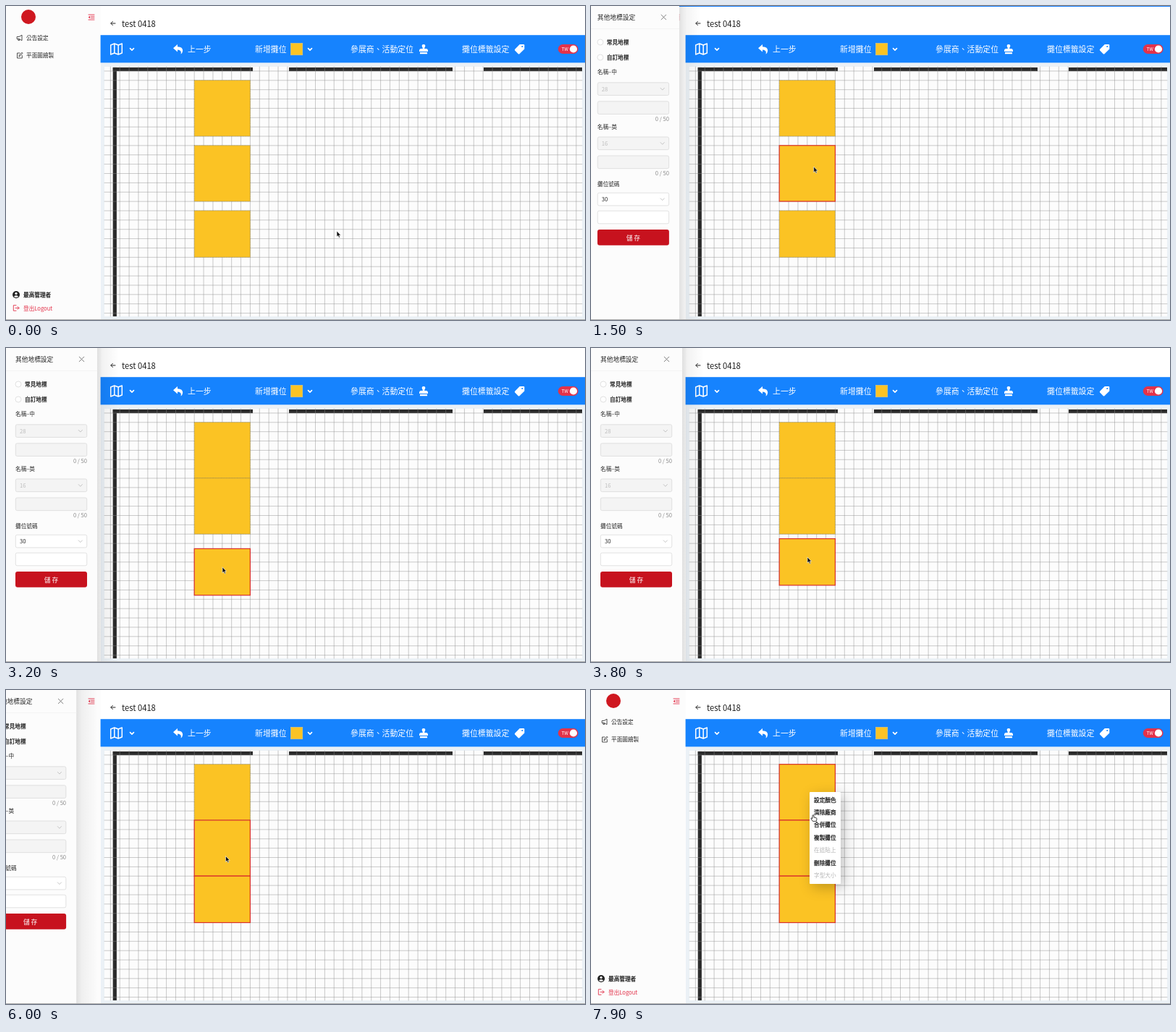
Recreate the animation shown at these times as an HTML page. Size 800x434 px, loop 8 s.

```html
<!DOCTYPE html>
<html lang="zh-Hant">
<head>
<meta charset="utf-8">
<title>Booth planner</title>
<style>
  html, body { margin: 0; width: 100%; height: 100%; overflow: hidden; background: #fff; }
  svg { display: block; width: 800px; height: 434px; }
  text { font-family: "Noto Sans CJK TC", "Noto Sans TC", "Noto Sans CJK JP", "Noto Sans CJK", sans-serif; white-space: pre; }
  .line { fill: none; stroke-linecap: round; stroke-linejoin: round; }
  .medium { stroke: #1c1c1c; stroke-width: .25; }
  #menu { filter: drop-shadow(4px 5px 9px rgba(0, 0, 0, .24)); }
</style>
</head>
<body>
<svg id="stage" viewBox="0 0 800 434">
  <defs>
    <linearGradient id="shade">
      <stop offset="0" stop-opacity=".11"/>
      <stop offset=".25" stop-opacity=".05"/>
      <stop offset="1" stop-opacity="0"/>
    </linearGradient>
  </defs>
  <g id="page"></g>
  <g id="booths"></g>
  <rect id="progress" y="0" height="1" fill="#1a82ff"/>
  <g id="drawer"></g>
  <g id="menu"></g>
  <rect y="433" width="800" height="1" fill="#a9a9a9"/>
  <path id="arrow" d="M0 0V8L1.8 6.4 3.1 9.2 4.5 8.6 3.3 5.9H5.7Z" fill="#111" stroke="#fff" stroke-width=".6"/>
  <path id="hand" d="M-1 .5Q0-.6 1 .5V3.2L4 3.9Q5.2 4.3 5 5.6L4.2 8.6H-.6L-3 5.1Q-3.2 4-2.1 4L-1 4.9Z" fill="#fff" stroke="#111" stroke-width=".8"/>
</svg>
<script>
const $ = id => document.getElementById(id);
const BLUE = '#1683fe', RED = '#e3324a', GOLD = '#fbc324', INK = '#262626';
const CELL = 12.87, LOOP = 8000, STEP = 100;

const rect = (x, y, w, h, fill, extra = '') =>
  `<rect x="${x}" y="${y}" width="${w}" height="${h}" fill="${fill}" ${extra}/>`;
const line = (d, color, width = 1, extra = '') =>
  `<path class="line" d="${d}" stroke="${color}" stroke-width="${width}" ${extra}/>`;
const shape = (d, fill) => `<path d="${d}" fill="${fill}"/>`;
const disc = (x, y, r, fill, extra = '') =>
  `<circle cx="${x}" cy="${y}" r="${r}" fill="${fill}" ${extra}/>`;
// Text is placed by its vertical centre.
const text = (x, cy, str, size = 7.64, fill = INK, extra = '') =>
  `<text x="${x}" y="${cy + size * .38}" font-size="${size}" fill="${fill}" ${extra}>${str}</text>`;
const MID = 'text-anchor="middle"', END = 'text-anchor="end"', MEDIUM = 'class="medium"';

function grid() {
  let d = '';
  for (let x = 260.2 - 9 * CELL; x < 796; x += CELL) d += `M${x} 84V429`;
  for (let y = 102.8 - CELL; y < 429; y += CELL) d += `M136 ${y}H796`;
  return line(d, '#8c8c8c', .65, 'opacity=".7"');
}

function sidebar() {
  return rect(0, 0, 131, 434, '#fcfcfc') +
    disc(31, 15, 10, '#cf1820') +
    line('M114 12H122M117.5 14.3H122M117.5 16.6H122M114 19H122', RED, .9) +
    shape('M113.7 15.5L116.2 13.6V17.4Z', RED) +
    line('M15.5 42.5H18L22 40.2V47.6L18 45.5H15.5ZM16.8 45.8V47.6H18.6V46', INK, .8) +
    text(28, 44, '公告設定') +
    line('M19 65H15.5V72H22.3V68.5M18 69.5L18.3 68 22 64.2 23 65.2 19.3 69.1Z', INK, .8) +
    text(28, 68, '平面圖繪製') +
    disc(14, 399, 5, '#222') + disc(14, 397.3, 1.6, '#fff') +
    shape('M10.8 401.5Q14 398.5 17.2 401.5 14 404.2 10.8 401.5Z', '#fff') +
    text(24, 399.5, '最高管理者', 7.64, '#111', MEDIUM) +
    line('M14 413.7H10.3V421.2H14M13 417.4H18M16 415.4L18 417.4 16 419.4', RED, .9) +
    text(24, 417.7, '登出Logout', 7.64, RED);
}

function toolbar() {
  const label = (x, str) => text(x, 60, str, 10.9, '#fff');
  const chevron = x => line(`M${x - 2.5} 58.6L${x} 61.1 ${x + 2.5} 58.6`, '#fff', 1.6);
  return rect(130.6, 40.2, 669.4, 38.2, BLUE) +
    line('M144.7 54L149.8 52 155.2 54 160.3 52V65L155.2 67 149.8 65 144.7 67ZM149.8 52V65M155.2 54V67', '#fff', 1.5) +
    chevron(174) +
    shape('M231 58.2L237 53V56.2Q244.5 56.5 244.2 62 243.8 65 241.6 66.5 243.2 61 237 60.6V63.6Z', '#fff') +
    label(251, '上一步') + label(344, '新增攤位') +
    rect(393.4, 51.4, 16.4, 16.4, GOLD, 'stroke="#d8c78a" stroke-width=".6"') +
    chevron(420) +
    label(476, '參展商、活動定位') +
    shape('M575.8 59Q576 57.8 575 56.5 573.8 53 577 53 580.2 53 579 56.5 578 57.8 578.2 59H580.5Q583 59.2 583 62V63H571V62Q571 59.2 573.5 59ZM572 64H582V66.2H572Z', '#fff') +
    label(630, '攤位標籤設定') +
    shape('M709.8 53H715.2Q716.3 53 716.3 54.2V59.5L709.4 66.2Q708.6 66.8 707.8 66.2L703.2 61.6Q702.4 60.6 703.2 59.7Z', '#fff') +
    disc(713.3, 56, 1.1, BLUE) +
    rect(762.8, 53, 27.8, 13, RED, 'rx="6.5"') +
    text(767.5, 59.6, 'TW', 6.4, '#fff') + disc(784, 59.5, 5.1, '#fff');
}

$('page').innerHTML =
  rect(131, 0, 669, 40.5, '#fff') + sidebar() +
  line('M151 24H145M147.4 21.4L144.8 24 147.4 26.6', INK, 1) +
  text(160, 24.5, 'test 0418', 11.2, '#1d1d1d') +
  rect(131, 78.4, 669, 355, '#ebf1f6') + rect(136, 84, 660, 345, '#fcfcfc') +
  rect(147.7, 84.9, 5.2, 344.1, '#2b2b2b') +
  [[147.7, 341], [391, 617], [660, 796]].map(([a, b]) => rect(a, 84.9, b - a, 5.2, '#2b2b2b')).join('') +
  grid() + toolbar();

$('booths').innerHTML = [6, 6, 5].map(n =>
  rect(260.2, 0, 6 * CELL, n * CELL, GOLD)).join('');
const booths = [...$('booths').children];

function drawer() {
  const field = (y, off) => rect(13.3, y, 98.4, 17.6, off ? '#f4f4f4' : '#fff', 'rx="2" stroke="#d6d6d6" stroke-width=".7"');
  const select = (y, value, off) => field(y, off) +
    text(19, y + 9, value, 7.64, off ? '#bdbdbd' : INK) +
    line(`M100.2 ${y + 7.6}L102.8 ${y + 10.3} 105.4 ${y + 7.6}`, '#b8b8b8', .8);
  const radio = (y, str) => disc(17, y, 4, '#fff', 'stroke="#d4d4d4" stroke-width=".7"') +
    text(26, y + .3, str, 7.64, INK, MEDIUM);
  const name = (y, str, size) => text(13, y, str) + select(y + 14.3, size, true) +
    field(y + 40.3, true) + text(112, y + 64.5, '0 / 50', 7.64, '#8c8c8c', END);
  return rect(126, 0, 30, 434, 'url(#shade)') + rect(-20, 0, 146, 434, '#fcfcfc') +
    text(13, 15.8, '其他地標設定', 8.72) +
    line('M101.2 12.2L107.8 18.8M107.8 12.2L101.2 18.8', '#777', .9) +
    line('M0 31.5H126', '#f0f0f0', .6) +
    radio(50, '常見地標') + radio(71, '自訂地標') +
    name(91.5, '名稱–中', '28') + name(166.7, '名稱–英', '16') +
    text(13, 246, '攤位號碼') + select(258.3, '30') + field(283.2) +
    rect(13, 309, 99, 21.8, '#c7121e', 'rx="3"') +
    text(62.5, 320.2, '儲 存', 8.72, '#fff', MID);
}
$('drawer').innerHTML = drawer();

$('menu').innerHTML = rect(302, 141, 43, 127, '#fff', 'rx="1"') +
  ['設定顏色', '清除廠商', '合併攤位', '複製攤位', '在這貼上', '刪除攤位', '字型大小'].map((str, i) => {
    const off = i == 4 || i == 6;
    return text(308, 151.6 + i * 17.4, str, 7.64, off ? '#b4b4b4' : '#1c1c1c', off ? '' : MEDIUM);
  }).join('');

// Cursor stops: time, x, y
const path = [
  [0, 457, 311], [500, 457, 311], [1150, 307.7, 222], [1600, 307.7, 222], [2100, 305, 211],
  [2300, 304, 225], [2500, 302.5, 255], [2800, 299, 308.3], [3000, 299, 308.3],
  [3700, 299, 289], [5300, 299, 289], [5700, 303.5, 229.5], [6200, 303.5, 229.5],
  [6600, 302, 141], [7300, 302, 141], [7900, 307, 172.8], [LOOP, 307, 172.8]
];

function cursorAt(t) {
  const i = path.findIndex(p => p[0] > t);
  const [t0, x0, y0] = path[i - 1], [t1, x1, y1] = path[i];
  const k = (t - t0) / (t1 - t0);
  return [x0 + (x1 - x0) * k, y0 + (y1 - y0) * k];
}

// cubic-bezier(.7, .3, .1, 1)
function ease(k) {
  if (k <= 0) return 0;
  if (k >= 1) return 1;
  const curve = (s, a, b) => 3 * s * (1 - s) ** 2 * a + 3 * s * s * (1 - s) * b + s ** 3;
  let lo = 0, hi = 1;
  for (let i = 0; i < 20; i++) {
    const s = (lo + hi) / 2;
    if (curve(s, .7, .1) < k) lo = s; else hi = s;
  }
  return curve(lo, .3, 1);
}

const move = (el, x, y) => el.setAttribute('transform', `translate(${x} ${y})`);
const show = (el, on) => el.style.display = on ? '' : 'none';

function draw(t) {
  const [x, y] = cursorAt(t);
  const top = 102.7, second = top + 7 * CELL, third = top + 14 * CELL;
  const tops = [
    top,
    t < 2200 ? second + (t > 1600 ? y - 222 : 0) : top + 6 * CELL,
    t < 2900 ? third : t < 4100 ? third + y - 308.3 : top + 12 * CELL
  ];
  const picked = [t >= 6600, t >= 1200 && t < 2900 || t >= 5800, t >= 2900];
  booths.forEach((el, i) => {
    el.setAttribute('y', tops[i]);
    el.setAttribute('stroke', picked[i] ? '#d9302c' : '#77704e');
    el.setAttribute('stroke-width', picked[i] ? 1.2 : .7);
    el.setAttribute('stroke-dasharray', picked[i] ? 'none' : '1.1 1.1');
  });

  const open = ease((t - 1284) / 300) - ease((t - 5912) / 300);
  show($('drawer'), open > 0);
  move($('drawer'), -126 * (1 - open), 0);

  show($('progress'), t >= 1200 && t < 1700);
  $('progress').setAttribute('width', Math.min(800, Math.max(0, (t - 1100) * 3)));

  show($('menu'), t >= 7100);
  const pointing = t >= 7500;
  show($('arrow'), !pointing);
  show($('hand'), pointing);
  move($(pointing ? 'hand' : 'arrow'), x, y);
}

function tick() {
  const t = performance.now() % LOOP;
  draw(Math.floor(t / STEP) * STEP);
  requestAnimationFrame(tick);
}
tick();
</script>
</body>
</html>
```
